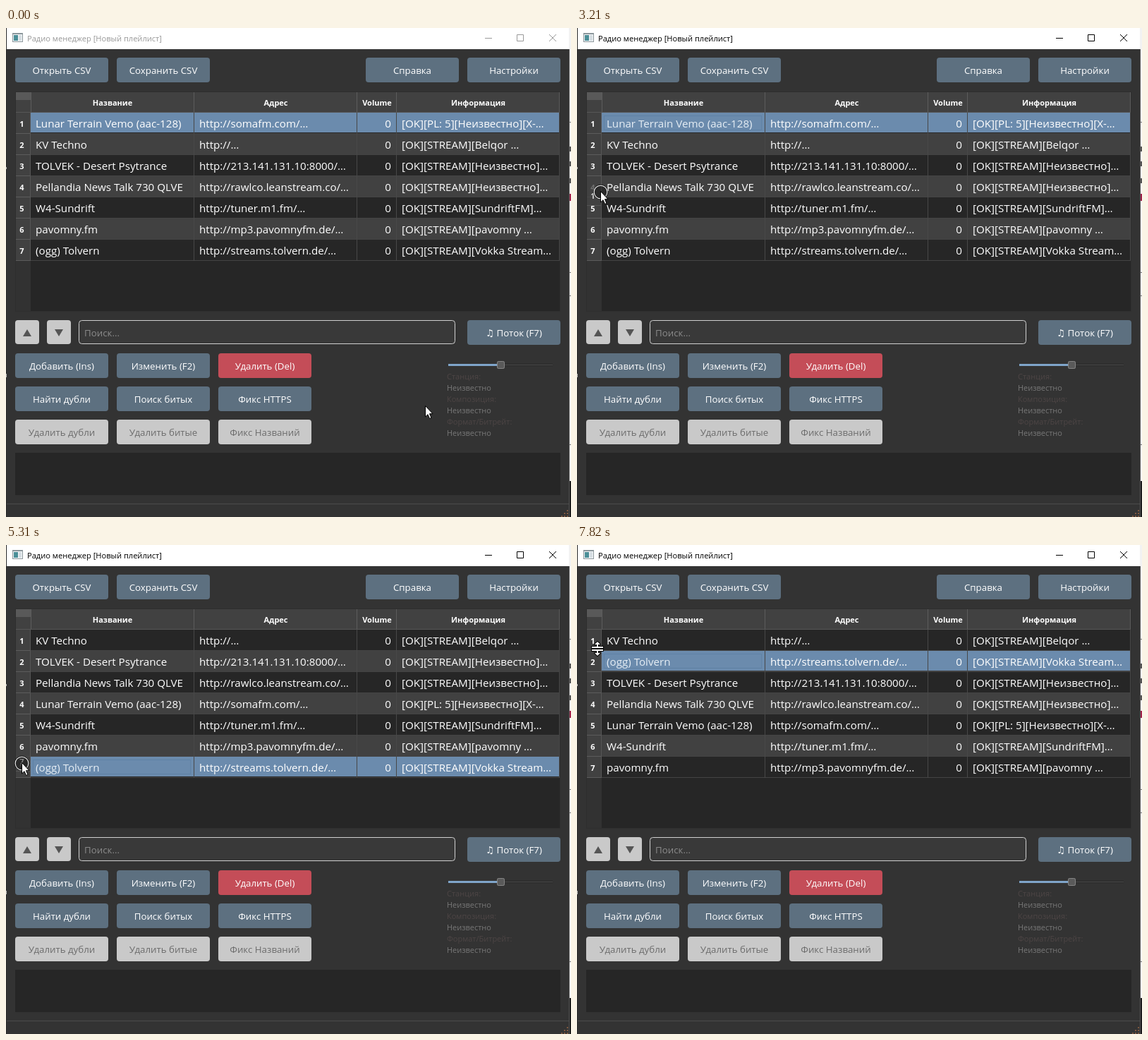
An HTML page that plays this animation: 801x693 px, repeating every 8000 ms.

```html
<!DOCTYPE html>
<html lang="ru">
<head>
<meta charset="utf-8">
<title>Радио менеджер</title>
<style>
html, body { margin: 0; width: 100%; height: 100%; overflow: hidden; background: #333; }
svg { display: block; }
text { font-family: "Open Sans", "DejaVu Sans", sans-serif; white-space: pre; }
.cell { font-size: 15.15px; fill: #fff; }
.btn { font-size: 13.3px; text-anchor: middle; }
.head { font-size: 11px; font-weight: 700; fill: #fff; text-anchor: middle; }
.small { font-size: 11px; }
</style>
</head>
<body>
<svg id="stage" width="801" height="693" viewBox="0 0 801 693"></svg>
<script>
const LOOP = 8000, TICK = 30, TOP = 120, ROW = 30;
const stage = document.getElementById('stage');

function add(tag, attrs, parent = stage, content) {
  const el = document.createElementNS('http://www.w3.org/2000/svg', tag);
  for (const k in attrs) el.setAttribute(k, attrs[k]);
  if (content !== undefined) el.textContent = content;
  parent.appendChild(el);
  return el;
}
const group = (parent = stage) => add('g', {}, parent);
const rect = (x, y, width, height, fill, rx = 0, parent = stage) =>
  add('rect', { x, y, width, height, fill, rx }, parent);
const frame = (x, y, width, height, stroke, rx = 0, parent = stage) =>
  add('rect', { x: x + .5, y: y + .5, width: width - 1, height: height - 1, rx, fill: 'none', stroke }, parent);
const text = (str, x, y, cls, extra = {}, parent = stage) =>
  add('text', { x, y, class: cls, ...extra }, parent, str);
const path = (d, attrs, parent = stage) => add('path', { d, ...attrs }, parent);

const BLUE = '#5d7080', RED = '#c44d58', OFF = '#c9c9c9';
function button(label, x, y, fill = BLUE) {
  rect(x, y, 132, 35, fill, 4);
  text(label, x + 66, y + 23, 'btn', { fill: fill === OFF ? '#6c6c6c' : '#fff' });
}

// Window
rect(0, 0, 801, 693, '#333333');
rect(0, 0, 801, 30, '#fff');
rect(0, 0, 1, 693, '#2a2a2a');
rect(0, 197, 1, 3, '#bbb');
rect(0, 490, 1, 5, '#bbb');
rect(798, 0, 3, 642, '#f2f2f2');
rect(798, 642, 3, 51, '#1c1c1c');
for (const y of [133, 346, 379, 590]) rect(798, y, 3, 1, '#777');
for (const y of [168, 189, 213]) rect(799, y, 2, 7, '#555');
rect(799, 235, 2, 10, '#a0224a');
rect(798, 30, 1, 663, '#555');

// Title bar
rect(9, 7, 15, 13, '#8c979c');
rect(10, 9, 13, 10, '#f3f6f8');
rect(11, 10, 6, 8, '#4b8f98');
rect(18, 10, 4, 8, '#d5dde2');
const title = text('Радио менеджер [Новый плейлист]', 30, 19, '', { 'font-size': '11.1px' });
const controls = path('M679 14.5H689M724.5 9.5H733.5V18.5H724.5ZM770 9L780 19M780 9L770 19', { fill: 'none' });

button('Открыть CSV', 13, 42);
button('Сохранить CSV', 157, 42);
button('Справка', 510, 42);
button('Настройки', 654, 42);

// Table
rect(13, 90, 773, 312, '#262626');
rect(14, 91, 771, 29, '#414141');
rect(14, 91, 21, 11, '#595959');
rect(14, 330, 21, 72, '#323232');
for (let i = 1; i < 7; i += 2) rect(35, TOP + i * ROW, 750, 29, '#414141');
const pick = group();
rect(35, TOP, 749, 28, '#6b8bad', 0, pick);
const focus = frame(38, 124, 224, 21, '#5f82a6', 0, pick);
for (let i = 0; i < 7; i++) rect(35, TOP + i * ROW + 29, 750, 1, '#444');
for (const x of [266, 497, 553, 784]) {
  rect(x, 91, 1, 29, '#5c5c5c');
  rect(x, TOP, 1, 210, '#484848');
}
rect(35, 91, 1, 29, '#5c5c5c');
rect(14, 119, 771, 1, '#565656');
frame(13, 90, 773, 312, '#2e2e2e');
[['Название', 151], ['Адрес', 382.5], ['Volume', 526], ['Информация', 669.5]]
  .forEach(([s, x]) => text(s, x, 110, 'head'));

function section(n, y, parent = stage) {
  rect(14, y, 21, 30, '#414141', 0, parent);
  rect(14, y + 29, 21, 1, '#5c5c5c', 0, parent);
  rect(34, y, 1, 30, '#565656', 0, parent);
  return text(n, 22.5, y + 20, 'head', {}, parent);
}
for (let i = 0; i < 7; i++) section(i + 1, TOP + i * ROW);

const rows = [
  ['Lunar Terrain Vemo (aac-128)', 'somafm.com/', '[PL: 5][Неизвестно][X-…'],
  ['KV Techno', '', '[STREAM][Belqor …'],
  ['TOLVEK - Desert Psytrance', '213.141.131.10:8000/', '[STREAM][Неизвестно]…'],
  ['Pellandia News Talk 730 QLVE', 'rawlco.leanstream.co/', '[STREAM][Неизвестно]…'],
  ['W4-Sundrift', 'tuner.m1.fm/', '[STREAM][SundriftFM]…'],
  ['pavomny.fm', 'mp3.pavomnyfm.de/', '[STREAM][pavomny …'],
  ['(ogg) Tolvern', 'streams.tolvern.de/', '[STREAM][Vokka Stream…']
].map(([name, host, info]) => {
  const g = group();
  const label = text(name, 42, 141, 'cell', {}, g);
  text(`http://${host}…`, 274, 141, 'cell', {}, g);
  text('0', 546, 141, 'cell', { 'text-anchor': 'end' }, g);
  text('[OK]' + info, 561, 141, 'cell', {}, g);
  return { g, label };
});

// Search and actions
rect(13, 414, 34, 34, OFF, 4);
rect(58, 414, 34, 34, OFF, 4);
path('M24 437L30 427L36 437ZM69 427H81L75 437Z', { fill: '#555' });
rect(103, 414, 534, 34, '#393939', 4);
frame(103, 414, 534, 34, '#d0d0d0', 4);
text('Поиск...', 111, 437, '', { 'font-size': '13.3px', fill: '#8b8b8b' });
button('♫ Поток (F7)', 654, 414);
[['Добавить (Ins)', 'Изменить (F2)', 'Удалить (Del)'],
 ['Найти дубли', 'Поиск битых', 'Фикс HTTPS'],
 ['Удалить дубли', 'Удалить битые', 'Фикс Названий']].forEach((line, r) =>
  line.forEach((s, c) => button(s, 13 + c * 144, 461 + r * 47, r === 2 ? OFF : !r && c === 2 ? RED : BLUE)));

// Player
rect(627, 476, 148, 3, '#262626');
rect(627, 477, 148, 1, '#505050');
rect(627, 476, 70, 3, '#7fa5ca');
rect(696, 472, 11, 11, '#5a5a5a', 2);
frame(696, 472, 11, 11, '#858585', 2);
['Станция:', 'Композиция:', 'Формат/Битрейт:'].forEach((s, i) => {
  text(s, 625, 498 + i * 32, 'small', { fill: '#4d4545' });
  text('Неизвестно', 625, 514 + i * 32, 'small', { fill: '#777' });
});

rect(13, 602, 773, 60, '#262626');
rect(1, 674, 797, 1, '#4b4b4b');
for (let i = 0; i < 3; i++)
  for (let j = 0; j <= i; j++) rect(795 - j * 4, 683 + i * 4, 2, 2, '#80583f');

// Dragged section and pointer
const ghost = group();
ghost.setAttribute('opacity', .75);
const ghostNum = section(1, 0, ghost);
const ring = group();
add('circle', { r: 9.5, fill: '#000', 'fill-opacity': .35, stroke: '#000', 'stroke-width': 2.4, 'stroke-opacity': .5 }, ring);
add('circle', { r: 9.3, fill: 'none', stroke: '#f4f4f4', 'stroke-width': 1.1 }, ring);
const ink = { fill: '#fff', stroke: '#000', 'stroke-linejoin': 'round' };
const arrow = path('M.5 .5V16L4 12.7L6.6 18.5L9 17.5L6.5 11.7H11Z', ink);
const split = path('M0 -10L4 -6H1V-3H8V-1H-8V-3H-1V-6H-4ZM0 10L4 6H1V3H8V1H-8V3H-1V6H-4Z',
  { ...ink, 'stroke-width': 2, 'paint-order': 'stroke' });

// Pointer path: time, x, y, eased arrival
const moves = [
  [0, 594, 535], [89, 594, 535], [90, 592, 535], [240, 591, 535], [900, 29, 184, 1],
  [1030, 37, 170], [1120, 35, 157], [1600, 22, 128, 1], [2020, 22, 129], [2110, 22, 139],
  [2820, 33, 221], [2880, 33, 223], [3030, 33, 225], [3210, 33, 231], [4330, 33, 232],
  [4660, 30, 293], [5010, 20, 318], [5190, 20, 317], [5960, 46, 182, 1], [6080, 44, 165],
  [6440, 41, 148], [7120, 40, 147], [7300, 37, 142], [7550, 36, 144], [7820, 28, 147], [LOOP, 28, 147]
];
// Row order and selection from a given time
const states = [
  [0, [0, 1, 2, 3, 4, 5, 6], 0],
  [3770, [1, 2, 3, 0, 4, 5, 6], 0],
  [5190, [1, 2, 3, 0, 4, 5, 6], 6],
  [6660, [1, 6, 2, 3, 0, 4, 5], 6]
];
// Press, release, section, grab height
const drags = [[1840, 3770, 1, 129], [5190, 6660, 7, 317]];

function pointer(t) {
  const i = Math.max(1, moves.findIndex(m => m[0] > t));
  const [t0, x0, y0] = moves[i - 1], [t1, x1, y1, ease] = moves[i];
  let p = (t - t0) / (t1 - t0);
  if (ease) p = p * p * (3 - 2 * p);
  return [Math.round(x0 + (x1 - x0) * p), Math.round(y0 + (y1 - y0) * p)];
}
const place = (el, x, y) => el.setAttribute('transform', `translate(${x} ${y})`);
const show = (el, on) => el.setAttribute('visibility', on ? 'visible' : 'hidden');

function draw(t) {
  const active = t >= 1840;
  title.setAttribute('fill', active ? '#000' : '#999');
  controls.setAttribute('stroke', active ? '#000' : '#999');
  show(focus, active);

  const [, order, selected] = states.filter(s => s[0] <= t).pop();
  order.forEach((id, pos) => {
    place(rows[id].g, 0, pos * ROW);
    rows[id].label.style.fill = active && id === selected ? '#e6eef5' : '#fff';
  });
  place(pick, 0, order.indexOf(selected) * ROW);

  const [x, y] = pointer(t);
  const drag = drags.find(d => t >= d[0] && t < d[1]);
  show(ring, drag);
  show(ghost, drag);
  if (drag) {
    const [, , n, grab] = drag;
    ghostNum.textContent = n;
    place(ghost, 0, TOP + (n - 1) * ROW + y - grab);
    place(ring, x + .5, y + 1.5);
  }
  const sizing = t >= 7640;
  show(arrow, !sizing);
  show(split, sizing);
  place(sizing ? split : arrow, x, y);
}

function tick() {
  const t = performance.now() % LOOP;
  draw(Math.floor(t / TICK) * TICK);
  requestAnimationFrame(tick);
}
tick();
</script>
</body>
</html>
```
